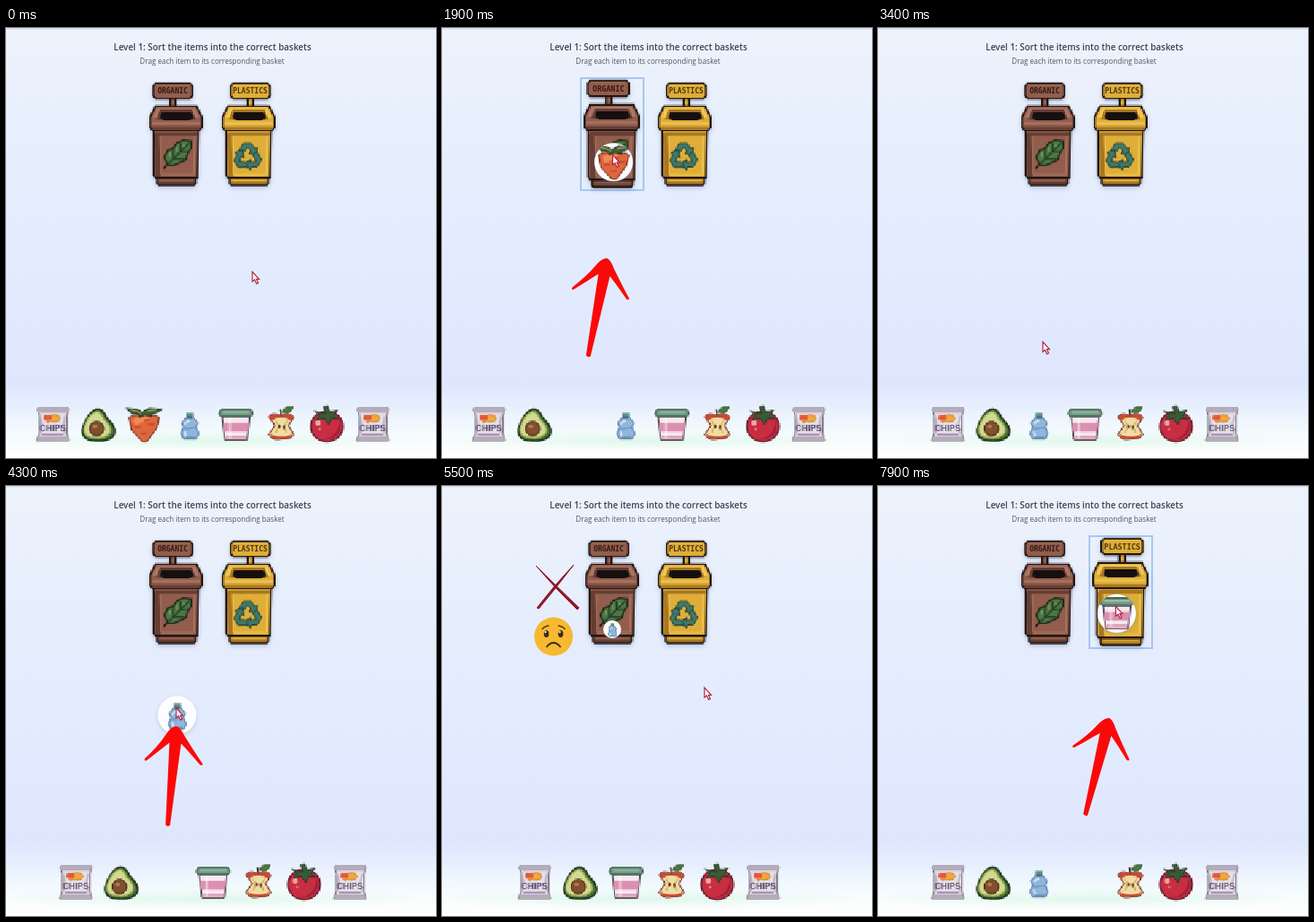
These frames come from a looping animation (480x480 px, 8 s). An HTML page with a canvas:

```html
<!DOCTYPE html>
<html lang="en">
<head>
<meta charset="utf-8">
<title>Sort the items</title>
<style>
html, body { margin: 0; width: 100%; height: 100%; overflow: hidden; background: #fff; }
canvas { display: block; width: 480px; height: 480px; }
</style>
</head>
<body>
<canvas width="480" height="480"></canvas>
<script>
let ctx = document.querySelector('canvas').getContext('2d');
ctx.imageSmoothingEnabled = false;
const LOOP = 8000;
const CELL = 1.5; // size of one pixel-art dot
const INK = '#211512';

// ---------- drawing helpers ----------
function shape(path, fill, stroke, width = 1.5) {
  const p = new Path2D(path);
  if (fill) { ctx.fillStyle = fill; ctx.fill(p); }
  if (stroke) { ctx.strokeStyle = stroke; ctx.lineWidth = width; ctx.stroke(p); }
}

function rect(x, y, w, h, fill) {
  ctx.fillStyle = fill;
  ctx.fillRect(x, y, w, h);
}

function oval(x, y, rx, ry, fill, stroke, width = 1.5) {
  ctx.beginPath();
  ctx.ellipse(x, y, rx, ry, 0, 0, 7);
  ctx.fillStyle = fill;
  ctx.fill();
  if (stroke) { ctx.strokeStyle = stroke; ctx.lineWidth = width; ctx.stroke(); }
}

function text(str, x, y, font, fill) {
  ctx.font = font;
  ctx.fillStyle = fill;
  ctx.textAlign = 'center';
  ctx.fillText(str, x, y);
}

function at(x, y, draw, scale = 1, angle = 0) {
  ctx.save();
  ctx.translate(x, y);
  ctx.rotate(angle);
  ctx.scale(scale, scale);
  draw();
  ctx.restore();
}

function withShadow(color, blur, draw) {
  ctx.save();
  ctx.shadowColor = color;
  ctx.shadowBlur = blur;
  ctx.shadowOffsetY = 2;
  draw();
  ctx.restore();
}

// Renders a drawing once at low resolution; the result paints it enlarged, centred on 0,0.
function sprite(draw, w = 48, h = 48) {
  const stage = ctx;
  const small = document.createElement('canvas');
  small.width = w / CELL;
  small.height = h / CELL;
  ctx = small.getContext('2d');
  ctx.scale(1 / CELL, 1 / CELL);
  ctx.translate(w / 2, h / 2);
  draw();
  ctx = stage;
  return () => ctx.drawImage(small, -w / 2, -h / 2, w, h);
}

// ---------- items, each centred on 0,0 ----------
const items = {
  bag() {
    shape('M-17-18H18L16-10V10L18 18H-18L-15 10V-10Z', '#e4dfe7', '#75697a', 1.5);
    shape('M-17-18H18L17-13H-16ZM-16 13H17L18 18H-18Z', '#b5adb9');
    shape('M-14-10L-12 0L-14 11M14-10L12 0L14 11', null, '#bcb2c2', 2);
    oval(2, -7, 6, 4, '#f2a93b', '#c9762a', 1);
    oval(-4, -8, 3, 3, '#e2583d');
    oval(-8, -8, 2.5, 3, '#e2583d');
    shape('M-10-6H-1L-5-1Z', '#e8873c');
    text('CHIPS', 0, 8, 'bold 9.5px "Liberation Sans", sans-serif', '#54456b');
    rect(-12, 10, 24, 2, '#a794b5');
  },
  avocado() {
    const half = 'M-3-17C2-19 6-15 9-8C14-2 20 3 18 10C15 17 5 19-3 18C-14 18-19 13-18 5C-16-2-12-13-3-17Z';
    shape(half, '#476f35', '#20361d', 2);
    at(-1.5, 0, () => shape(half, '#d3d990', '#9caf57', 2), .82);
    oval(-2, 4.5, 8, 8, '#80502f', '#4c2c1a');
    oval(-4, 2, 2.5, 2, '#b07c50');
  },
  carrot() {
    shape('M-17-8C-8-13 8-13 17-8L14 4L3 19H-2L-14 6Z', '#df663d', '#71311f');
    shape('M-13-6C-7-9 0-9 6-8L-5-1L-10 1Z', '#f18a52');
    shape('M-11 3H-4M4 0H12M-4 10H3M0-5H6', null, '#a94529', 1.5);
    shape('M-20-18L-8-17L-2-14L5-18L20-17L13-13L7-13L9-9L1-11L-5-8L-7-13L-13-12Z', '#3d6337', '#273e28');
    shape('M-15-17L-3-13M4-15L14-17', null, '#83914e', 2);
  },
  bottle() {
    shape('M-4-8H4L9-2L7 3L10 10L7 16H-7L-10 10L-7 3L-9-2Z', '#91b6dc', '#587da5', 1.5);
    rect(-4, -13, 8, 5, '#578b82');
    rect(-3, -9, 6, 2, '#35567d');
    shape('M-6-1L0-5M-6 8L-4 13', null, '#d5e9f6', 2);
    shape('M-7 4C-2 6 2 2 7 4M-5 14H6', null, '#618bb8', 1.5);
  },
  yogurt() {
    shape('M-15-9H16L13 17H-12Z', '#f6e8ef', '#4d3d49', 1.5);
    shape('M-14-2H15L14 8H-13Z', '#dc8fb1');
    rect(-11, 12, 23, 4, '#e3a5bf');
    rect(-8, -8, 3, 23, 'rgba(255,255,255,.45)');
    shape('M-16-17H17L19-14V-11L17-9H-16L-18-11V-14Z', '#719b83', '#354e42');
    rect(-14, -15, 29, 2, '#9abda6');
  },
  apple() {
    shape('M-14-9C-9-14-4-11 0-10C5-13 11-13 14-8L8 1L14 11C9 18 4 15 0 16C-5 17-10 17-14 11L-7 1Z', '#f1dda1', '#6d2a23');
    shape('M-14-9C-9-14-4-11 0-10C5-13 11-13 14-8L11-4C5-9-5-9-11-4ZM-13 10C-5 14 6 14 13 10L10 15C4 15-4 17-10 15Z', '#c64b36');
    shape('M-6-4L-3 2L-6 9M7-4L3 2L6 9', null, '#cfa65f', 1.5);
    oval(-2, 2, 1.3, 2.5, '#633b24');
    oval(3, 3, 1.3, 2.5, '#633b24');
    shape('M0-10L-1-17', null, '#533624', 2);
    shape('M1-14C4-21 9-20 13-20C12-14 7-12 1-14Z', '#4c7c3c', '#263f25', 1);
  },
  tomato() {
    oval(0, 2, 18, 17, '#c82d42', '#5f1829', 1.7);
    shape('M14-6C19 8 10 18-6 17C9 15 14 6 14-6Z', '#9c2038');
    oval(-10, -2, 3, 3.5, '#f3a3a4');
    oval(-8, 5, 1.5, 1.5, '#e87882');
    shape('M-1-12L-4-20L1-21L3-14L12-16L8-10L13-6L5-7L2 0L-3-7L-12-5L-8-11L-14-15Z', '#365d36', '#20341f', 1);
  }
};
for (const name in items) items[name] = sprite(items[name]);

// ---------- bins ----------
function leaf() {
  shape('M-14 39L-7 31', null, INK, 2);
  shape('M-9 35L-13 26L-9 18L-3 16L1 10L8 7L17 8V16L13 22L11 29L4 32L-2 35Z', '#4c7643', '#1f2c1d', 2);
  shape('M-9 34L15 10M-3 28V17M5 20V10M-3 28H10M5 20H14', null, '#243b24', 1.6);
  shape('M-7 25V21M1 20V14M9 15V11', null, '#79a15a', 1.6);
}

function recycling() {
  for (let i = 0; i < 3; i++) {
    at(-1, 25.5, () => shape('M-10-6L-5-15H4L8-9L11-10L10-1L1-4L4-6L0-11L-5-4Z', '#3f7a6b', '#29463c', 1.3), 1, i * Math.PI * 2 / 3);
  }
}

const bins = [
  { x: 189.5, signX: -3.5, label: 'ORGANIC', base: '#925d4c', light: '#ad7866', dark: '#653d33', text: '#331912', emblem: leaf },
  { x: 270.5, signX: 2, label: 'PLASTICS', base: '#deae38', light: '#f0c85a', dark: '#a87722', text: '#4e3510', emblem: recycling }
];

function binArt({ base, light, dark, signX, emblem }) {
  rect(signX - 4, -40, 8, 11, INK);
  rect(signX - 2, -40, 4, 11, base);
  shape(`M${signX - 19}-56.5h38l3 3v11l-3 3h-38l-3-3v-11Z`, base, INK, 2);
  shape(`M${signX - 19}-55h38`, null, light, 1.2);

  shape('M-21 47H22V55L20 57H-19L-21 55Z', dark, INK, 2);
  shape('M-25-5H25L24 49H-23L-25 46Z', base, INK, 2);
  rect(-19, 51, 39, 2, base);
  shape('M-24 0H-19L-17 48H-23Z', dark);
  shape('M-17 2V45H20L21 2', null, light, 1.2);
  rect(-23, -2, 47, 4, dark);

  shape('M-23-31H23L29-19V-7L26-4H-26L-29-7V-19Z', base, INK, 2);
  shape('M-21-29H21L26-18H-26Z', light);
  shape('M-18-27H18L22-16H-22Z', dark);
  shape('M-16-24H17L20-18L14-15H-13L-18-18Z', '#160f10');
  rect(-27, -13, 54, 2, light);
  rect(-27, -8, 54, 3, dark);
  emblem();
}
for (const bin of bins) bin.paint = sprite(() => binArt(bin), 72, 126);

function drawBin(bin) {
  withShadow('rgba(90,105,150,.35)', 5, bin.paint);
  text(bin.label, bin.signX, -45, 'bold 8px "DejaVu Sans Mono", monospace', bin.text);
}

// ---------- overlays ----------
const heart = sprite(() => at(0, 0, () => {
  shape('M0 21C-13 16-21 6-20-5C-19-19-6-22 0-13C6-22 19-19 20-5C21 6 13 16 0 21Z', '#c3202e', '#2b1014', 1.6);
  shape('M18-5C17 8 9 15 0 19C7 10 14 4 18-5Z', '#96172a');
  oval(-12, -11, 4, 2.5, '#fff');
  oval(-16, -5, 1.5, 2, '#fff');
  oval(11, -12, 3, 1.8, '#f3a2a5');
  for (const x of [-7, 8]) {
    oval(x, -1, 2.4, 2.6, '#241014');
    oval(x - .7, -2, .9, .9, '#fff');
    oval(x * 1.6, 4, 2, 1.3, '#ef9299');
  }
  shape('M-3 3Q0 8 4 3', null, '#241014', 1.4);
}, 1, -.6));

function sadFace() {
  oval(0, 0, 21.5, 21.5, '#f7b92f');
  for (const side of [-1, 1]) {
    oval(side * 8, -3, 2.8, 4, '#3c2a1b');
    oval(side * 8 - 1, -5, 1, 1.2, '#fff');
    shape(`M${side * 5}-12Q${side * 9}-12 ${side * 13}-8`, null, '#5b3a1c', 1.5);
  }
  shape('M-8 12Q0 2 8 12', null, '#3c2a1b', 1.8);
}

function cross() {
  shape('M105 89Q126 110 153 136L151 138Q125 113 105 89Z', '#8d1827', '#8d1827', 1);
  shape('M147 88Q126 110 106 136L108 137Q128 113 147 88Z', '#8d1827', '#8d1827', 1);
}

function redArrow() {
  shape('M0 0C4 1 7 5 10 10C18 21 26 31 33 40Q32 42 30 41C23 34 15 26 7 19L2 111Q0 113-3 111L-6 19C-14 26-22 34-30 41Q-33 42-32 39C-24 30-16 20-10 9C-7 4-4 1 0 0Z', '#fb0909');
}

function pointer() {
  shape('M0 0V11L2.5 9L4.7 13.5L6.5 12.6L4.5 8.3H7.5Z', '#fff', '#b02640', 1.2);
}

// ---------- timeline ----------
const cursorPath = [
  [0, 275, 272], [250, 275, 272], [850, 154, 434], [1000, 154, 434], [1200, 161, 341],
  [1800, 190, 142], [2500, 194, 140], [2900, 194, 140], [3600, 180, 434], [3800, 180, 434],
  [4300, 190, 248], [4700, 190, 150], [5050, 190, 150], [5450, 293, 225], [5750, 293, 225],
  [6450, 206, 434], [6650, 206, 434], [7000, 202, 334], [7650, 264, 135], [8000, 266, 134]
];
const drags = [
  { item: 'carrot', from: 1000, to: 2000 },
  { item: 'bottle', from: 3750, to: 4900 },
  { item: 'yogurt', from: 6600, to: LOOP }
];
const arrows = [
  { from: 1000, to: 1950, x: 184, y: 257, angle: 10.5 },
  { from: 3800, to: 4700, x: 190, y: 268, angle: 4.6 },
  { from: 6700, to: LOOP, x: 258, y: 259, angle: 13.5 }
];
const order = ['bag', 'avocado', 'carrot', 'bottle', 'yogurt', 'apple', 'tomato', 'bag'];
const during = (t, from, to) => t >= from && t < to;

function cursorAt(t) {
  const next = cursorPath.findIndex(key => key[0] > t);
  const [t0, x0, y0] = cursorPath[next - 1];
  const [t1, x1, y1] = cursorPath[next];
  const k = (t - t0) / (t1 - t0);
  return { x: x0 + (x1 - x0) * k, y: y0 + (y1 - y0) * k };
}

function disc(x, y, item, radius, scale) {
  withShadow('rgba(100,110,150,.25)', 5, () => oval(x, y, radius, radius, '#fdfdff'));
  ctx.save();
  ctx.beginPath();
  ctx.arc(x, y, radius, 0, 7);
  ctx.clip();
  at(x, y, items[item], scale);
  ctx.restore();
}

function background() {
  const sky = ctx.createLinearGradient(0, 0, 0, 480);
  [[0, '#edf3fc'], [.3, '#e6eefd'], [.6, '#e2eafe'], [.83, '#dfe7fe'],
   [.88, '#e7effe'], [.93, '#f2f9fd'], [.98, '#fcfefe'], [1, '#fff']]
    .forEach(([stop, color]) => sky.addColorStop(stop, color));
  rect(0, 0, 480, 480, sky);
  rect(0, 0, 480, 1.5, '#d9dfea');

  const grass = ctx.createRadialGradient(0, 0, 0, 0, 0, 1);
  grass.addColorStop(0, 'rgba(212,245,226,.65)');
  grass.addColorStop(1, 'rgba(212,245,226,0)');
  ctx.save();
  ctx.translate(230, 461);
  ctx.scale(240, 11);
  rect(-1, -1, 2, 2, grass);
  ctx.restore();

  text('Level 1: Sort the items into the correct baskets', 230.5, 24.5, '600 9.88px "Open Sans", sans-serif', '#3b4453');
  text('Drag each item to its corresponding basket', 230, 40, '8.09px "Open Sans", sans-serif', '#4f5766');
}

function draw(t) {
  const cursor = cursorAt(t);
  const drag = drags.find(d => during(t, d.from, d.to));
  const bottleBinned = during(t, 4900, 7150);
  background();

  for (const bin of bins) {
    const over = Math.abs(cursor.x - bin.x) < 32 && cursor.y > 55 && cursor.y < 178;
    if (over && drag) {
      ctx.strokeStyle = '#a5c8f0';
      ctx.lineWidth = 2;
      ctx.strokeRect(bin.x - 34.5, 56, 70, 125);
    }
    at(bin.x, 118, () => drawBin(bin), over ? (drag ? 1.05 : 1.03) : 1);
  }
  if (bottleBinned) disc(190, 160, 'bottle', 10, .5);

  const row = order.filter(name =>
    !(name === 'carrot' && t >= 2000) && !(name === 'bottle' && bottleBinned));
  row.forEach((name, i) => {
    if (drag && drag.item === name) return;
    at(230.5 + (i - (row.length - 1) / 2) * 51, 442.5, items[name]);
  });

  if (during(t, 2150, 2950)) at(132, 131, heart);
  if (during(t, 5050, 6050)) {
    cross();
    at(124.5, 168, sadFace);
  }
  if (drag) disc(cursor.x + 1, cursor.y + 8, drag.item, 21.5, 1);
  at(cursor.x, cursor.y, pointer);
  for (const a of arrows) {
    if (during(t, a.from, a.to)) at(a.x, a.y, redArrow, 1, a.angle * Math.PI / 180);
  }
}

function frame() {
  draw(performance.now() % LOOP);
  requestAnimationFrame(frame);
}
frame();
</script>
</body>
</html>
```
